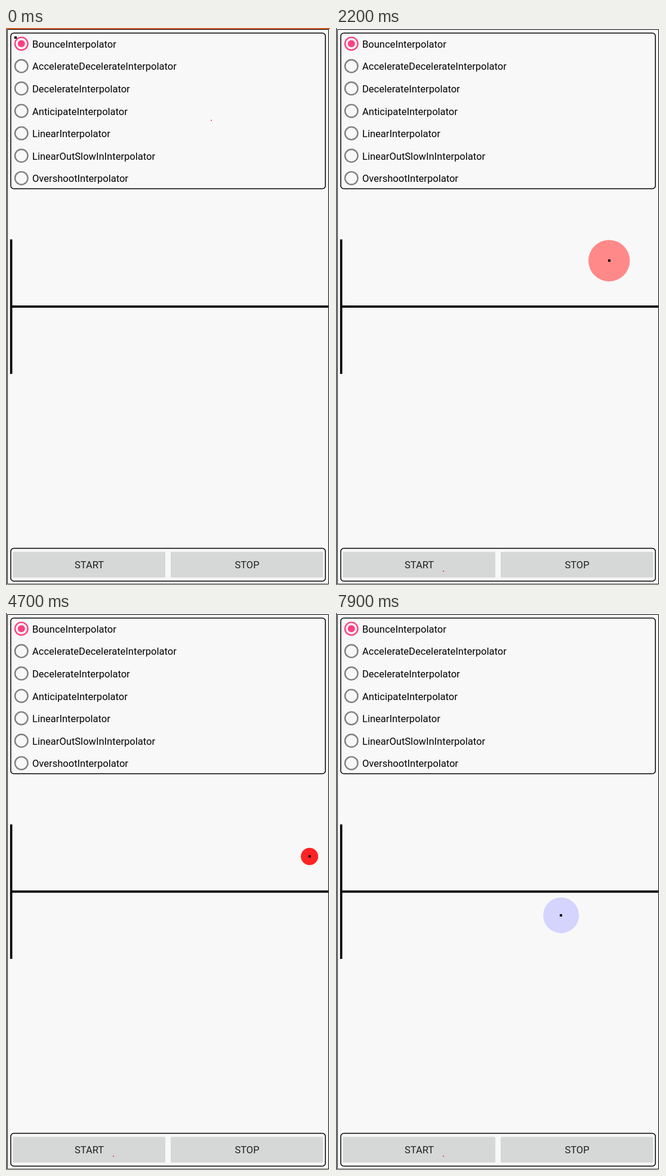
An HTML page that plays this animation: 543 px wide and 934 px high, repeating every 8 s.

```html
<!DOCTYPE html>
<html lang="en">
<head>
<meta charset="utf-8">
<title>Interpolators</title>
<style>
  html, body { margin: 0; width: 100%; height: 100%; overflow: hidden; background: #fdf7f9; }
  svg { display: block; width: 543px; height: 934px; }
  text { font-family: Roboto, sans-serif; font-size: 16.55px; fill: #000; }
  .btn { fill: #d6d7d7; }
  .caption { text-anchor: middle; fill: #212121; font-size: 16.5px; }
  .box { fill: none; stroke: #000; stroke-width: 1.5; }
  .axis { fill: none; stroke: #000; stroke-width: 3.7; }
</style>
</head>
<body>
<svg viewBox="0 0 543 934">
  <rect x="2.5" y="2.5" width="538" height="930" fill="#f8f8f8" stroke="#000"/>
  <path d="M.5 0V934" stroke="#000"/>
  <rect id="strip" width="543" height="2" fill="#d8622f"/>
  <rect class="box" x="8" y="8.5" width="527.3" height="261" rx="5"/>
  <g id="radios"></g>
  <circle id="ball"/>
  <path class="axis" d="M8.7 354.5V580M8.7 467.2H540"/>
  <rect id="dot" width="4" height="4"/>
  <rect class="box" x="8" y="872.5" width="527.3" height="55" rx="5"/>
  <rect class="btn" x="11.5" y="878.5" width="255.5" height="43" rx="1.5"/>
  <rect class="btn" x="276" y="878.5" width="255.5" height="43" rx="1.5"/>
  <text class="caption" x="139.5" y="906">START</text>
  <text class="caption" x="404" y="906">STOP</text>
  <rect id="pointer" width="2" height="1.5" fill="#e8323c"/>
</svg>
<script>
const LOOP = 8000, STEP = 100, PRESS = 800, BEGIN = 861, RUN = 4570;
const SCALE = 0.75; // device pixels to stage pixels
const RADII = [20, 80, 60, 10, 35, 55, 10];
const COLORS = [[0, 255, 0], [255, 255, 0], [0, 0, 255], [255, 255, 255], [255, 0, 0]];
const NAMES = ["Bounce", "AccelerateDecelerate", "Decelerate", "Anticipate",
  "Linear", "LinearOutSlowIn", "Overshoot"];

const el = id => document.getElementById(id);
const [strip, ball, dot, pointer] = ["strip", "ball", "dot", "pointer"].map(el);

function set(node, attrs) {
  for (const key in attrs) node.setAttribute(key, attrs[key]);
}

el("radios").innerHTML = NAMES.map((name, i) => {
  const y = 26.3 + i * 37.58;
  const color = i ? "#808080" : "#ff4081";
  const core = i ? "" : `<circle cx="25.8" cy="${y}" r="6" fill="${color}"/>`;
  return `<circle cx="25.8" cy="${y}" r="10.7" fill="none" stroke="${color}" stroke-width="2.4"/>` +
    core + `<text x="44" y="${y + 6.5}">${name}Interpolator</text>`;
}).join("");

function bounce(t) {
  t *= 1.1226;
  if (t < 0.3535) return 8 * t * t;
  if (t < 0.7408) return 8 * (t - 0.54719) ** 2 + 0.7;
  if (t < 0.9644) return 8 * (t - 0.8526) ** 2 + 0.9;
  return 8 * (t - 1.0435) ** 2 + 0.95;
}

// Value at u along evenly spaced keys
function along(keys, u) {
  const pos = u * (keys.length - 1);
  const i = Math.min(Math.floor(pos), keys.length - 2);
  const mix = (a, b) => a + (b - a) * (pos - i);
  const a = keys[i], b = keys[i + 1];
  return Array.isArray(a) ? a.map((v, k) => mix(v, b[k])) : mix(a, b);
}

function draw(time) {
  const t = Math.floor(time / STEP) * STEP;
  const idle = t < PRESS;
  strip.style.display = idle ? "" : "none";
  ball.style.display = idle ? "none" : "";
  set(pointer, idle ? { x: 343, y: 154 } : { x: 179, y: 910 });
  let x = 16, y = 16;
  if (!idle) {
    const run = Math.max(0, t - BEGIN) / RUN;
    const u = Math.min(1, bounce(run > 1 ? 2 - run : run));
    x = 16.3 + 510 * u;
    y = 460 + 75 * Math.sin((x - 1.3) / SCALE * Math.PI / 180);
    const rgb = along(COLORS, u).map(Math.round);
    set(ball, { cx: x, cy: y, r: along(RADII, u) * SCALE, fill: `rgb(${rgb})` });
  }
  set(dot, { x: Math.round(x - 2), y: Math.round(y - 2) });
}

const start = performance.now();
function tick() {
  draw((performance.now() - start) % LOOP);
  requestAnimationFrame(tick);
}
tick();
</script>
</body>
</html>
```
